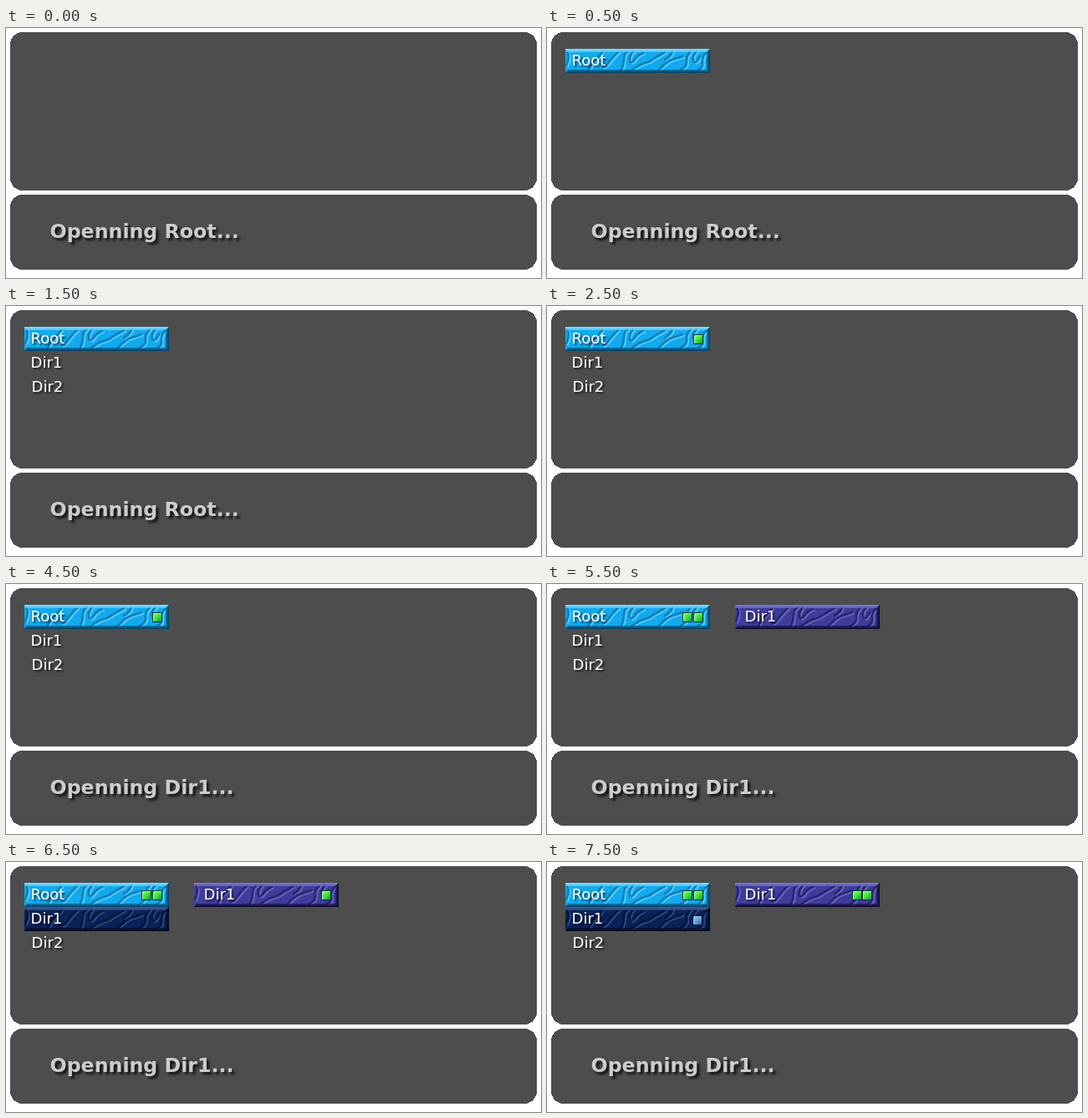
An HTML page that plays this animation: 640x300 px, repeating every 8 s.

```html
<!DOCTYPE html>
<html lang="en">
<head>
<meta charset="utf-8">
<title>Opening folders</title>
<style>
html, body { margin: 0; width: 100%; height: 100%; overflow: hidden; background: #fff; }
svg { display: block; }
text { font-family: Verdana, "DejaVu Sans", sans-serif; white-space: pre; }
.panel { fill: #4d4d4d; shape-rendering: crispEdges; }
.item { font-size: 18px; fill: #fff; filter: drop-shadow(2px 2px 1px rgba(0, 0, 0, .65)); }
.status { font-size: 23.7px; font-weight: bold; fill: #ccc; filter: drop-shadow(3px 3px 1.5px rgba(0, 0, 0, .75)); }
</style>
</head>
<body>
<svg id="stage" width="640" height="300" viewBox="0 0 640 300">
  <defs>
    <clipPath id="face"><rect width="173" height="29"/></clipPath>
    <filter id="soft" x="-10%" y="-20%" width="120%" height="140%"><feGaussianBlur stdDeviation=".7"/></filter>
    <path id="cracks" d="M2 3Q6 9 1 20 M44 4Q40 10 36 13T28 25 M63 4Q59 7 52 16T44 21 M75 3Q70 5 70 12T67 25 M81 3Q76 8 77 14T85 10Q88 7 93 5 M80 25Q88 19 95 17T105 12L119 4 M112 25Q121 15 128 13T140 9 M128 3Q126 9 119 13 M150 3Q144 9 145 15T138 25 M157 3Q151 8 153 14T161 9 M169 4Q163 9 164 16T159 25"/>
  </defs>
  <rect class="panel" x="5" y="5" width="630" height="190" rx="15"/>
  <rect class="panel" x="5" y="200" width="630" height="90" rx="15"/>
</svg>
<script>
const LOOP = 8000;
const stage = document.getElementById('stage');
const defs = stage.querySelector('defs');
const parts = [];

function add(parent, tag, attrs, text) {
  const el = document.createElementNS('http://www.w3.org/2000/svg', tag);
  for (const k in attrs) el.setAttribute(k, attrs[k]);
  if (text) el.textContent = text;
  parent.append(el);
  return el;
}

function group(x, y, from, to = LOOP) {
  const el = add(stage, 'g', { transform: `translate(${x} ${y})` });
  parts.push({ el, from, to });
  return el;
}

function gradient(id, colors, x2, y2) {
  const g = add(defs, 'linearGradient', { id, x1: 0, y1: 0, x2, y2 });
  colors.forEach((c, i) => add(g, 'stop', { offset: i / (colors.length - 1), 'stop-color': c }));
}

function bar(x, y, from, skin) {
  const g = add(group(x, y, from), 'g', { 'clip-path': 'url(#face)' });
  add(g, 'rect', { width: 173, height: 29, fill: skin.base });
  const line = (stroke, width, dx, dy, opacity) => add(g, 'use', {
    href: '#cracks', x: dx, y: dy, fill: 'none', stroke, opacity,
    'stroke-width': width, 'stroke-linecap': 'round', filter: 'url(#soft)'
  });
  line(skin.light, 2.2, 2, 1.5, .55);
  line(skin.crack, 2.6, 0, 0, .85);
  add(g, 'path', { d: 'M0 0H173L169 4H0Z', fill: skin.light, opacity: .55 });
  add(g, 'path', { d: 'M0 0H173L171 2H0Z', fill: skin.light, opacity: .6 });
  add(g, 'path', { d: 'M173 0V29H0L3 25H169V4Z', fill: skin.edge, opacity: .6 });
  add(g, 'path', { d: 'M173 0V29H0L1 27H171V2Z', fill: skin.edge, opacity: .8 });
}

function lamp(x, y, from, color) {
  const g = group(x, y, from);
  add(g, 'rect', { width: 12, height: 12, rx: 1.5, fill: color === 'blue' ? '#061536' : '#07351f' });
  add(g, 'rect', { x: 1, y: 1, width: 10, height: 10, rx: 1, fill: color === 'blue' ? '#9cc8ef' : '#c4f7b4' });
  add(g, 'rect', { x: 2, y: 2, width: 9, height: 9, rx: 1, fill: `url(#${color})` });
}

function label(text, x, y, from, to, cls = 'item') {
  add(group(x, y, from, to), 'text', { class: cls }, text);
}

gradient('green', ['#7df56a', '#3fdc3c', '#0c9a22'], 1, 1);
gradient('blue', ['#86bdec', '#5a9fda', '#2c64a4'], 1, 1);

const sky = { base: '#12aaec', light: '#8fe2ff', crack: '#0878b8', edge: '#024066' };
const violet = { base: '#403c9c', light: '#8583d0', crack: '#25226e', edge: '#0d0b34' };
const navy = { base: '#092358', light: '#45659c', crack: '#04133a', edge: '#010a22' };

bar(22, 25, 500, sky);
bar(225, 25, 5500, violet);
bar(22, 54, 6500, navy);

label('Root', 29.6, 45, 500);
label('Dir1', 29.6, 74, 1500);
label('Dir2', 30.6, 103, 1500);
label('Dir1', 236.6, 45, 5500);

lamp(175, 34, 2500, 'green');
lamp(162, 34, 5500, 'green');
lamp(377, 34, 6500, 'green');
lamp(365, 34, 7500, 'green');
lamp(174, 64, 7500, 'blue');

label('Openning Root...', 52.5, 252, 0, 2500, 'status');
label('Openning Dir1...', 52.5, 252, 4500, LOOP, 'status');

const start = performance.now();
function draw(now) {
  const t = Math.max(0, now - start) % LOOP;
  for (const { el, from, to } of parts) {
    el.style.display = t >= from && t < to ? '' : 'none';
  }
  requestAnimationFrame(draw);
}
draw(start);
</script>
</body>
</html>
```
